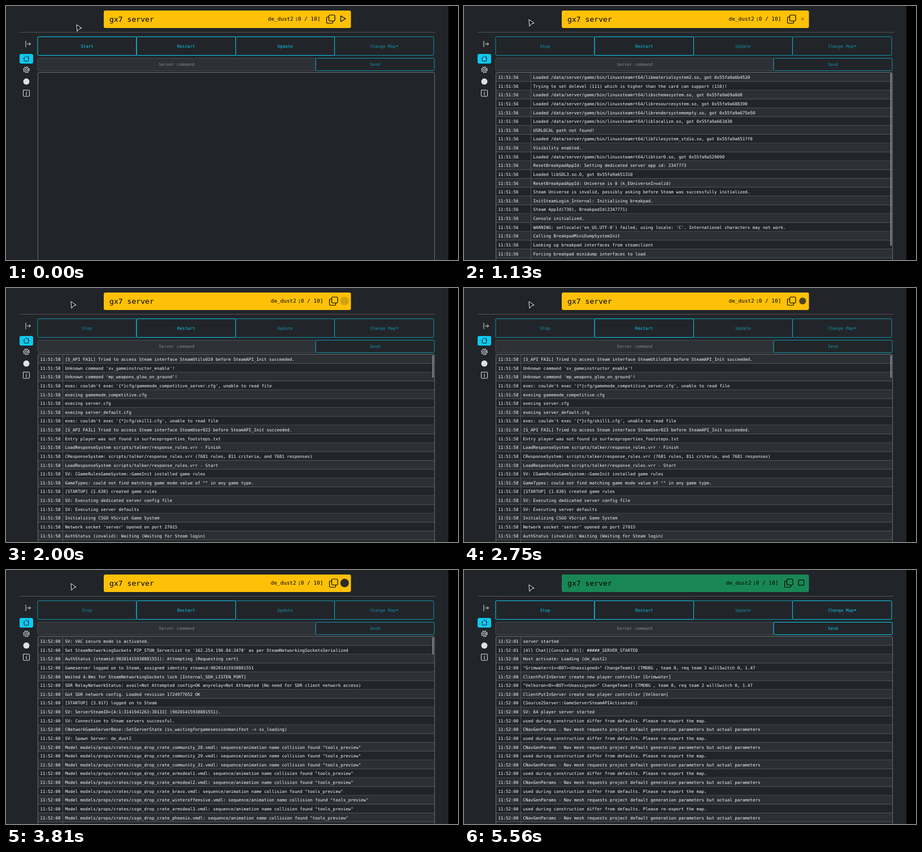
An HTML page that plays this animation: 800 by 450 pixels, repeating every 5.62 s.

```html
<!DOCTYPE html>
<html lang="en">
<head>
<meta charset="utf-8">
<title>Server console</title>
<style>
  html, body { margin: 0; width: 100%; height: 100%; overflow: hidden; background: #212529; }
  svg { display: block; width: 800px; height: 450px; font: 7.5px "DejaVu Sans Mono", monospace; }
  text { white-space: pre; }
  .mid { text-anchor: middle; }
  .line { fill: none; stroke: #50555a; }
  .icon { fill: none; stroke: #dee2e6; stroke-linejoin: round; stroke-linecap: round; }
  .btn rect { fill: none; stroke: #0dcaf0; }
  .btn text, .btn path { fill: #0dcaf0; }
  .btn.off { opacity: .65; }
  .btn.hover rect { fill: #0dcaf0; }
  .btn.hover text { fill: #000; }
  .mark { fill: none; stroke: #000; stroke-width: 1.2; stroke-linejoin: round; }
</style>
</head>
<body>
<svg id="stage" viewBox="0 0 800 450"></svg>
<script>
const LOOP = 5620, START = 550, READY = 4600, ROW = 15.63, TOP = 118.4;

const lib = (name, addr) => `Loaded /data/server/game/bin/linuxsteamrt64/lib${name}.so, got 0x55fa9a${addr}`;
const crate = name => `Model models/props/crates/csgo_drop_crate_${name}.vmdl: sequence/animation name collision found "tools_preview"`;
const join = (name, slot, team, end) => [
  `"${name}<${slot}><BOT><Unassigned>" ChangeTeam() CTMDBG , team 0, req team ${team} willSwitch 0, 1.47`,
  `ClientPutInServer create new player controller [${name}]`];
const navMesh = Array.from({ length: 12 }, (_, i) => i % 2
  ? 'CNavGenParams - Nav mesh requests project default generation parameters but actual parameters'
  : 'used during construction differ from defaults. Please re-export the map.');

// Each batch: when it lands, column divider, scrollbar length, clock, rows (newest first)
const batches = [
  { at: START, split: 315, bar: 0, clock: '11:51:55', rows: ['Starting server'] },
  { at: 720, split: 118.5, bar: 306, clock: '11:51:56', rows: [
    lib('materialsystem2', '6b4520'),
    'Trying to set dxlevel (111) which is higher than the card can support (110)!',
    lib('schemasystem', '69a8d0'), lib('resourcesystem', '688390'),
    lib('rendersystemempty', '675e50'), lib('localize', '663d30'),
    'USRLOCAL path not found!',
    lib('filesystem_stdio', '6517f0'),
    'Visibility enabled.',
    lib('tier0', '529090'),
    'ResetBreakpadAppId: Setting dedicated server app id: 2347773',
    'Loaded libSDL3.so.0, got 0x55fa9a651310',
    'ResetBreakpadAppId: Universe is 0 (k_EUniverseInvalid)',
    'Steam Universe is invalid, possibly asking before Steam was successfully initialized.',
    'InitSteamLogin_Internal: Initializing breakpad.',
    'Steam AppId(730), BreakpadId(2347771)',
    'Console initialized.',
    "WARNING: setlocale('en_US.UTF-8') failed, using locale: 'C'. International characters may not work.",
    'Calling BreakpadMiniDumpSystemInit',
    'Looking up breakpad interfaces from steamclient',
    'Forcing breakpad minidump interfaces to load'] },
  { at: 1300, split: 100.5, bar: 56, clock: '11:51:57', rows: [
    'CAppInfoCacheReadFromDiskThread took 0 milliseconds to initialize',
    'SteamGameServer_Init()',
    'SwitchToLoop game requested: id [2] addons []',
    'CL: CLoopModeLevelLoad::MaybeSwitchToGameLoop switching to "game" loopmode with addons ()',
    "SV: Level loading started for 'de_dust2'",
    'SwitchToLoop levelload requested: id [2] addons []',
    'HostStateRequest::Start(HSR_GAME): loop(levelload) id(2) addons() desc(Loading (de_dust2))',
    'CHostStateMgr::QueueNewRequest( Loading (de_dust2), 2 )',
    'Loading map "de_dust2"',
    "[S_API] SteamAPI_Init(): Loaded '/root/.steam/sdk64/steamclient.so' OK. (First tried local 'steamclient.so')",
    'steamclient.so: cannot open shared object file: No such file or directory',
    'with error:',
    'steamclient.so',
    'dlopen failed trying to load:',
    'Host activate: Idle (console)',
    'SwitchToLoop console requested: id [1] addons []',
    'HostStateRequest::Start(HSR_IDLE): loop(console) id(1) addons() desc(Idle (console))',
    'Source2Init OK',
    'CHostStateMgr::QueueNewRequest( Idle (console), 1 )',
    '[STARTUP] {1.088} server module init ok',
    'CEntitySystem::BuildEntityNetworking (parallel build of server) took 31.615 msecs for 220 out of 301 classes'] },
  { at: 1900, split: 100.5, bar: 40, clock: '11:51:58', rows: [
    '[S_API FAIL] Tried to access Steam interface SteamUtils010 before SteamAPI_Init succeeded.',
    "Unknown command 'sv_gameinstructor_enable'!",
    "Unknown command 'mp_weapons_glow_on_ground'!",
    "exec: couldn't exec '{*}cfg/gamemode_competitive_server.cfg', unable to read file",
    'execing gamemode_competitive.cfg',
    'execing server.cfg',
    'execing server_default.cfg',
    "exec: couldn't exec '{*}cfg/skill1.cfg', unable to read file",
    '[S_API FAIL] Tried to access Steam interface SteamUser023 before SteamAPI_Init succeeded.',
    'Entry player was not found in surfaceproperties_footsteps.txt',
    'LoadResponseSystem scripts/talker/response_rules.vrr - Finish',
    'CResponseSystem: scripts/talker/response_rules.vrr (7681 rules, 811 criteria, and 7681 responses)',
    'LoadResponseSystem scripts/talker/response_rules.vrr - Start',
    'SV: CGameRulesGameSystem::GameInit installed game rules',
    'GameTypes: could not find matching game mode value of "" in any game type.',
    '[STARTUP] {1.630} created game rules',
    'SV: Executing dedicated server config file',
    'SV: Executing server defaults',
    'Initializing CSGO VScript Game System',
    "Network socket 'server' opened on port 27015",
    'AuthStatus (invalid): Waiting (Waiting for Steam login)'] },
  { at: 3190, split: 100.5, bar: 31, clock: '11:52:00', rows: [
    'SV: VAC secure mode is activated.',
    "Set SteamNetworkingSockets P2P_STUN_ServerList to '162.254.196.84:3478' as per SteamNetworkingSocketsSerialized",
    'AuthStatus (steamid:90201415938881551): Attempting (Requesting cert)',
    'Gameserver logged on to Steam, assigned identity steamid:90201415938881551',
    'Waited 4.0ms for SteamNetworkingSockets lock [Internal_SDR_LISTEN_PORT]',
    'SDR RelayNetworkStatus: avail=Not Attempted config=OK anyrelay=Not Attempted (No need for SDR client network access)',
    'Got SDR network config. Loaded revision 1724977652 OK',
    '[STARTUP] {3.917} logged on to Steam',
    'SV: ServerSteamID=[A:1:3141941263:30133] (90201415938881551).',
    'SV: Connection to Steam servers successful.',
    'CNetworkGameServerBase::SetServerState (ss_waitingforgamesessionmanifest -> ss_loading)',
    'SV: Spawn Server: de_dust2',
    ...['community_28', 'community_29', 'community_31', 'armsdeal1', 'armsdeal2', 'bravo',
      'winteroffensive', 'armsdeal3', 'phoenix'].map(crate)] },
  { at: 3880, split: 100.5, bar: 26, clock: '11:52:00', newer: 2, rows: [
    'server started',
    '[All Chat][Console (0)]: #####_SERVER_STARTED',
    'Host activate: Loading (de_dust2)',
    ...join('Grimwater', 1, 3), ...join('Velkoran', 0, 2),
    'CSource2Server::GameServerSteamAPIActivated()',
    'SV: 64 player server started',
    ...navMesh] }
];

const esc = s => s.replace(/&/g, '&amp;').replace(/</g, '&lt;');
const label = (x, y, s, attrs = '') => `<text x="${x}" y="${y}" ${attrs}>${esc(s)}</text>`;
const rect = (x, y, w, h, attrs = '') => `<rect x="${x}" y="${y}" width="${w}" height="${h}" ${attrs}/>`;
const button = (id, x, y, w, h, s, extra = '') =>
  `<g id="${id}" class="btn">${rect(x, y, w, h, 'rx="1.5"')}${label(x + w / 2, y + h / 2 + 2.8, s, 'class="mid"')}${extra}</g>`;

function logTable({ split, clock, newer = 0, rows }) {
  const count = rows.length > 1 ? 22 : 1;
  let out = '';
  for (let i = 0; i < count; i++) {
    const y = TOP + i * ROW;
    if (i % 2 === 0) out += rect(57, y, 701, ROW, 'fill="#2c3034"');
    out += `<path class="line" d="M57 ${y + ROW - .5}H758"/>`;
    if (rows[i]) {
      out += label(60.4, y + 10.6, i < newer ? '11:52:01' : clock, 'fill="#f8f9fa"') +
        label(split + 4, y + 10.6, rows[i], 'fill="#f8f9fa"');
    }
  }
  return `<g class="batch">${out}<path class="line" d="M${split} ${TOP}V${TOP + count * ROW}"/></g>`;
}

const stage = document.getElementById('stage');
stage.innerHTML =
  rect(0, 0, 800, 450, 'fill="#212529"') + rect(783, 0, 17, 450) +
  rect(173, 8, 437.5, 31, 'id="banner" rx="3"') +
  label(183, 28, 'gx7 server', 'font-size="13.1"') +
  `<g id="info">${label(463.5, 26.3, 'de_dust2', 'font-size="9.4"')}${label(512, 26, '[')}` +
  label(516.8, 26.3, '0 / 10]', 'font-size="9.4"') +
  `<g class="mark">${rect(571.5, 16, 10.5, 10.5, 'rx="1.5"')}<path d="M571.5 19.5H569q-1.500 0-1.500 1.500V29q0 1.500 1.500 1.500H577q1.500 0 1.500-1.500V26.500"/></g></g>` +
  '<path id="play" class="mark" d="M592.500 17.500V27.500L601 22.500Z"/>' +
  rect(592, 17.500, 9.500, 9.500, 'id="stop" class="mark" rx="1"') +
  '<circle id="spinner" cx="599.300" cy="23" fill="#212529"/>' +
  '<path class="line" d="M24 46.500H760"/>' +
  '<path class="icon" d="M35 62V72.500M37.500 67.200H43.500M41 64.700L43.500 67.200L41 69.700"/>' +
  rect(24, 85, 24, 17, 'rx="3" fill="#0dcaf0"') +
  '<path class="icon" style="stroke:#16242b" d="M30.800 93.200L36 88.300L41.200 93.200M32.300 92V97.700H39.700V92M39.500 89V91"/>' +
  '<g class="icon"><circle cx="36" cy="113" r="1.900"/><circle cx="36" cy="113" r="4.200"/>' +
  '<circle cx="36" cy="113" r="5.200" stroke-width="1.200" stroke-linecap="butt" stroke-dasharray="2 2.084"/></g>' +
  '<circle cx="36" cy="133.800" r="5.500" fill="#dee2e6"/>' +
  rect(30.500, 149, 11, 11, 'class="icon" rx="1"') +
  '<path class="icon" d="M36.500 151.800V152M35.300 153.800H36.300L35.700 157.300H36.600"/>' +
  button('map', 581.5, 54.5, 175.5, 33, 'Change Map ', '<path d="M690 70H694.500L692.250 72.500Z"/>') +
  button('update', 406.5, 54.5, 175, 33, 'Update') +
  button('power', 56, 54.5, 175, 33, 'Start') +
  button('restart', 231, 54.5, 175.5, 33, 'Restart') +
  rect(56, 92.5, 492, 22, 'rx="1.5" fill="#2d3136" stroke="#454a50"') +
  label(302, 106.3, 'Server command', 'class="mid" fill="#84878a"') +
  button('send', 548, 92.5, 210, 22, 'Send') +
  batches.map(logTable).join('') +
  rect(56.5, 117.5, 702, 360, 'rx="2.500" fill="none" stroke="#6a6f74"') +
  rect(754.6, 119, 2.4, 0, 'id="bar" rx="1.200" fill="#85898d"') +
  '<path id="cursor" d="M0 0L9 6.300L4.500 7.300L1 12Z" fill="#000" stroke="#fff" stroke-linejoin="round"/>';

const $ = id => document.getElementById(id);
const set = (id, attrs) => { for (const k in attrs) $(id).setAttribute(k, attrs[k]); };
const show = (el, on) => { el.style.display = on ? '' : 'none'; };
const ramp = (t, from, to) => Math.min(1, Math.max(0, (t - from) / (to - from)));
const ease = p => p * p * (3 - 2 * p);
const logs = [...document.querySelectorAll('.batch')];
const powerText = document.querySelector('#power text');

function draw(t) {
  const idle = t < START, up = t >= READY, busy = !idle && !up;

  // Pointer visits the Start button, then rests on the left of the banner
  const go = ease(ramp(t, 0, 300)), back = ease(ramp(t, START, 800));
  const x = 125 + 18 * go - 28 * back, y = 33 + 38 * go - 47 * back + (up ? 2 : 0);
  set('cursor', { transform: `translate(${x} ${y})` });

  set('banner', { fill: up ? '#198754' : '#ffc107' });
  set('info', { transform: `translate(${busy ? 5 : 0} 0)` });
  show($('play'), idle);
  show($('stop'), up);
  show($('spinner'), busy);
  const phase = (t / 500 + .9) % 1;
  set('spinner', { r: 7.6 * Math.min(1, phase * 2), opacity: 1 - Math.abs(1 - phase * 2) });

  powerText.textContent = idle ? 'Start' : 'Stop';
  $('power').classList.toggle('hover', idle && y > 55);
  $('power').classList.toggle('off', busy);
  $('update').classList.toggle('off', !idle);
  for (const id of ['map', 'send']) $(id).classList.toggle('off', !up);

  const current = batches.filter(b => t >= b.at).length - 1;
  logs.forEach((g, i) => show(g, i === current));
  set('bar', { height: current < 0 ? 0 : batches[current].bar, opacity: 1 - ramp(t, 5100, 5300) });
}

const begin = performance.now();
(function tick() {
  draw((performance.now() - begin) % LOOP);
  requestAnimationFrame(tick);
})();
</script>
</body>
</html>
```
